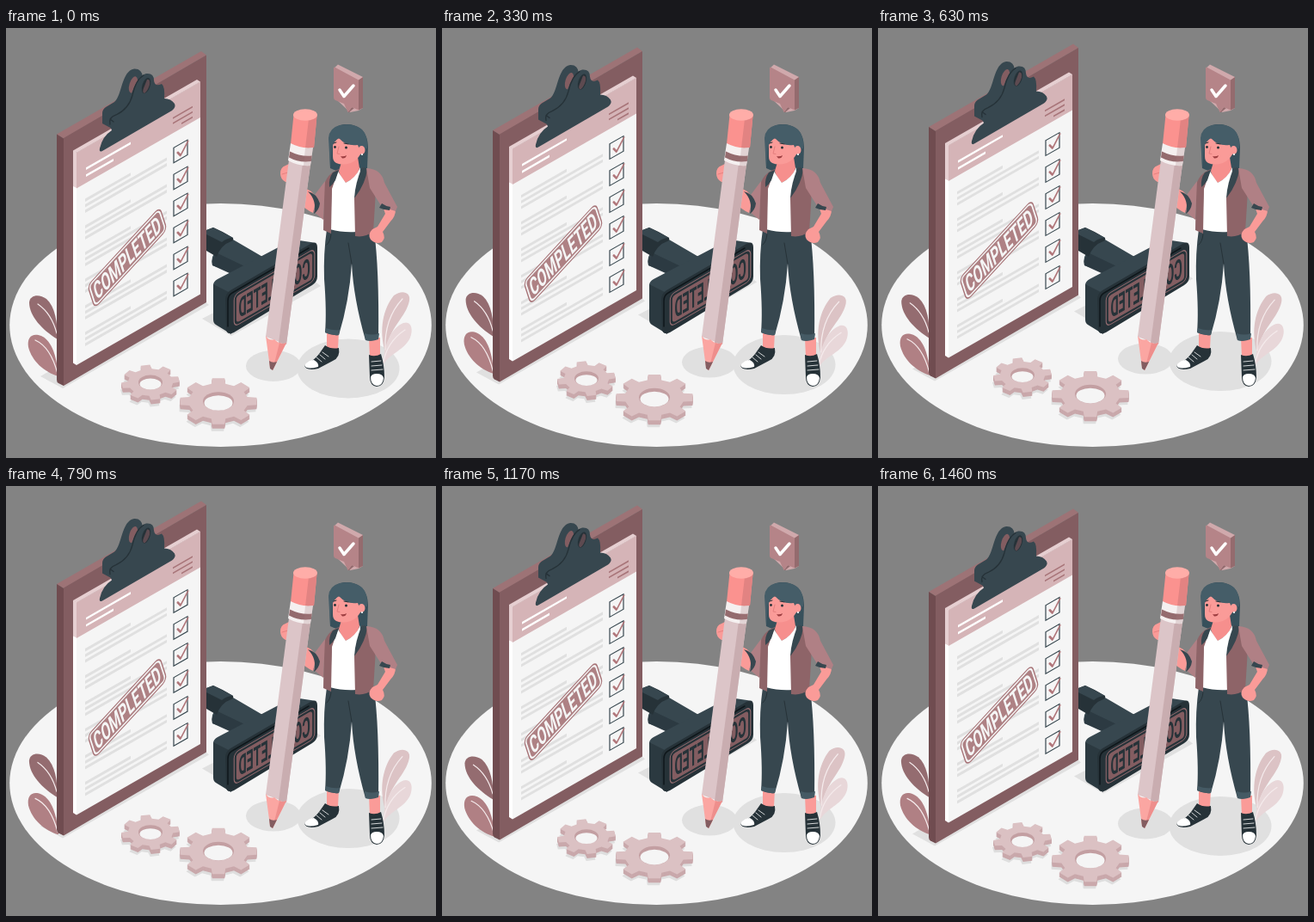
Recreate the animation shown at these times as an HTML page. Size 500x500 px, loop 1500 ms.

```html
<!DOCTYPE html>
<html lang="en">
<head>
<meta charset="utf-8">
<title>Completed checklist</title>
<style>
html, body { margin: 0; width: 100%; height: 100%; overflow: hidden; background: #838383; }
svg { display: block; width: 100vw; height: 100vh; }
.mark { font: bold 24px Roboto, "Liberation Sans", sans-serif; text-anchor: middle; }
.line { fill: none; stroke-linecap: round; stroke-linejoin: round; }
</style>
</head>
<body>
<svg viewBox="0 0 500 500" xmlns="http://www.w3.org/2000/svg">
  <ellipse cx="249.5" cy="345.5" rx="245.3" ry="141.5" fill="#f5f5f5"/>

  <g class="float" fill="#e0e0e0">
    <path d="M40 405L66 419L236 322L214 304Z"/>
    <path d="M228 338L262 358L366 300L340 280Z"/>
    <ellipse cx="311" cy="393" rx="32" ry="18"/>
    <ellipse cx="398" cy="396" rx="59.5" ry="34.5"/>
  </g>

  <g id="plants">
    <path d="M60 362C42 351 27 335 27 319C28 310 39 309 47 315C57 324 60 342 60 362Z" fill="#946c70"/>
    <path d="M61 405C44 400 30 387 26 371C24 359 31 354 41 358C54 364 59 383 61 405Z" fill="#b08084"/>
    <path d="M441 377C433 350 439 326 451 311C460 304 471 307 469 317C465 337 446 347 441 377Z" fill="#dcc3c5"/>
    <path d="M439 391C439 368 448 349 462 343C471 340 474 350 470 360C463 375 448 377 439 391Z" fill="#e8d7d9"/>
    <g class="line" stroke="#f5ebec" stroke-width="1.2">
      <path d="M37 321Q53 332 59 355M34 363Q52 371 60 402M461 315C448 329 440 349 441 374M464 351C450 360 441 374 439 389"/>
    </g>
  </g>

  <g id="stamp">
    <path d="M264 246L300 267L286 292L240 276Q237 266 247 255Q255 246 264 246Z" fill="#37474f"/>
    <path d="M240 276Q238 268 246 262L290 283L284 296Z" fill="#2c3a42"/>
    <path d="M233 235L241 232Q249 235 264 244Q265 247 262 248Q250 252 245 266L233 259Z" fill="#263238"/>
    <path d="M233 235L241 232L264 244Q257 244 251 249L233 240Z" fill="#37474f"/>
    <path d="M241 299Q241 295 246 292L332 247Q337 245 341 247L361 250L258 314Z" fill="#37474f"/>
    <path d="M241 298L261 308L262 356L244 345Q241 343 241 339Z" fill="#2b3940"/>
    <path d="M255 316Q255 309 261 305L354 251Q362 247 362 255V289Q362 295 356 299L265 354Q256 358 256 349Z" fill="#263238"/>
    <path d="M258 347V317Q258 311 263 308L352 256" class="line" stroke="#0f171b" stroke-width="1.5"/>
    <g transform="matrix(-.866 .5 0 1 312 302)">
      <rect x="-54" y="-18.5" width="108" height="37" rx="6" fill="none" stroke="#946c70" stroke-width="1.2"/>
      <rect x="-51" y="-15.5" width="102" height="31" rx="4" fill="#835d61"/>
      <text class="mark" fill="#263238" transform="translate(0 11.5) scale(.69 1.34)">COMPLETED</text>
    </g>
  </g>

  <g class="float">
    <path d="M59 123.5L227 27L233 31.5L67 128.5Z" fill="#9d7376"/>
    <path d="M59 123.5L67 128.5V416L61 413Q59 412 59 409Z" fill="#704c50"/>
    <path d="M67 128L233 31.5V319L67 416Z" fill="#835d61"/>
    <path d="M78 142.5L222 60L226 62.5L82 145Z" fill="#e6cfd1"/>
    <path d="M78 142.5L82 145V392L78 389.5Z" fill="#fff"/>
    <path d="M78 142.5L82 145V186L78 184Z" fill="#e6cfd1"/>
    <g id="paper" transform="matrix(1 -.573 0 1 82 145)">
      <path d="M0 0H144V247H0Z" fill="#f5f5f5"/>
      <path d="M0 0H144V41.5H0Z" fill="#d5b4b7"/>
      <path d="M11 25H63M11 33H43" stroke="#fff" stroke-width="2.7"/>
      <path d="M112 24H135M112 30H135M122 36H135" stroke="#a87579" stroke-width="1.8"/>
    </g>
    <g transform="matrix(.79 -.86 .28 .86 141 267)">
      <rect x="-53" y="-15" width="106" height="30" rx="6" fill="#f5f5f5" stroke="#a87579" stroke-width="1.4"/>
      <rect x="-50.5" y="-12.5" width="101" height="25" rx="4" fill="#ae8184"/>
      <text class="mark" fill="#f5f5f5" transform="translate(0 10.2) scale(.69 1.2)">COMPLETED</text>
    </g>
    <path d="M112 99Q112 95 116 92L126 86C135 79 134 50 149 47.5Q158 47 159 57L180 84L125 118L112 111Z" fill="#37474f"/>
    <ellipse cx="148" cy="66" rx="4.5" ry="10" transform="rotate(17 148 66)" fill="#835d61"/>
    <path d="M121 114C117 104 128 103 136 95C146 86 148 57 163 53Q172 52 172 61Q173 69 181 65Q185 68 184 82Q192 82 196 88Q198 92 193 96L112 143Q108 145 109 140Q112 126 123 119Z" fill="#37474f"/>
    <ellipse cx="163" cy="67" rx="4.5" ry="9.5" transform="rotate(18 163 67)" fill="#263238"/>
    <path d="M164 60Q168 59 167 66Q165 73 161 76Q158 75 160 70Z" fill="#5d4a50"/>
    <path d="M121 112Q119 104 128 101Q143 94 147 78Q151 60 160 55M121 106L125 109" class="line" stroke="#263238" stroke-width="1.3"/>
  </g>

  <g class="float" id="gears"></g>

  <g id="bubble">
    <path d="M381 47L386 42.5L415 57V93L410 96L400 98L381 80Z" fill="#d0a9ac"/>
    <path d="M410 60.5L415 57V93L410 95.5Z" fill="#946b6e"/>
    <path d="M402 92L405 93L399 98L397.5 98Z" fill="#946b6e"/>
    <path d="M381 47Q381 45 383 46L410 60.5V95.5L402 92L397.5 98L393 88L383 84Q381 83 381 81Z" fill="#b58488"/>
    <path d="M388 72L393 79.5L404 67" class="line" stroke="#fff" stroke-width="3.5"/>
  </g>

  <g id="woman">
    <path d="M373 353H387L386 373Q378 376 373 371ZM422 360H435V383H423Z" fill="#fa9b98"/>
    <path d="M371 369Q378 374 387 372Q389 383 380 387L363 396Q348 399 347 392Q357 388 364 379Z" fill="#263238"/>
    <path d="M347 392Q352 386 358 386Q364 389 363 394Q349 398 347 392Z" fill="#fff"/>
    <path d="M422 380Q429 383 436 379Q440 392 440 406Q439 417 431 417Q423 416 423 406Z" fill="#263238"/>
    <path d="M424 406Q425 402 431 402Q438 402 439 407Q438 416 431 416Q424 415 424 406Z" fill="#fff"/>
    <path d="M365 380L371 385M368 377L375 382M361 383L367 388M425 388L436 387M425 393L437 392M425 398L438 397" class="line" stroke="#fff" stroke-width=".8"/>
    <path d="M373 234L428 236Q434 280 433 361Q426 365 418 363Q404 314 402 274Q399 318 387 357Q379 358 371 354Q373 330 370 292Q369 262 373 234Z" fill="#37474f"/>
    <path d="M372 349Q380 352 388 351L387 357Q379 358 371 354ZM417 355Q426 358 434 355L433 362Q426 365 418 363Z" fill="#455a64"/>
    <path d="M402 274L398 250M378 240Q377 249 373 252" class="line" stroke="#263238" stroke-width="1"/>

    <path d="M376 132C375 118 386 111 398 112C412 113 421 122 421 139L420 163L412 166L397 166Q386 168 377 163Z" fill="#37505b"/>
    <path d="M391 153L409 150L411 163Q410 172 395 180Q388 172 387 166Z" fill="#f68f8d"/>
    <path d="M386 167L395 180Q407 174 412 162L411 180L407 237Q391 238 377 234L379 183Z" fill="#fff"/>
    <path d="M387 164Q372 170 370 184L369 235L378 239L379 187Z" fill="#8e6468"/>
    <path d="M387 165L380 168Q375 175 376 185Q380 182 383 177Z" fill="#37474f"/>
    <path d="M414 162L424 166Q431 179 429 206L427 237Q417 244 406 242L405 198Z" fill="#8e6468"/>
    <path d="M414 162L420 163Q419 180 405 198Q406 180 414 162Z" fill="#37474f"/>
    <path d="M438 207L453 211Q453 219 447 225L438 237Q442 244 437 249Q430 252 424 246Q420 240 426 234L432 231L441 216Z" fill="#fa9b98"/>
    <path d="M419 163Q437 164 440 180L455 208L453 213L437 208L423 186Z" fill="#b08085"/>
    <path d="M437 204Q441 207 447 208L446 212Q440 212 434 209Z" fill="#37474f"/>
    <path d="M345 186Q355 187 361 198L357 215Q348 211 341 203Z" fill="#fa9b98"/>
    <path d="M371 178L369 223L357 213Q364 205 359 194Z" fill="#b08085"/>
    <path d="M351 190Q361 192 365 204Q364 212 358 216Q362 201 351 190Z" fill="#37474f"/>
    <path d="M329 158L325 160Q319 162 319 169Q319 176 325 179L334 180V160Z" fill="#fa9b98"/>
    <path d="M321 170L328 168" class="line" stroke="#e47f7e" stroke-width=".9"/>

    <path d="M380 128L411 130L412 147Q408 154 401 157Q391 160 384 157Q380 155 380 149Z" fill="#fa9b98"/>
    <path d="M375 128Q376 116 388 113Q404 110 414 118Q421 125 420 140L411 141L409 136Q396 138 387 128Q381 132 379 139L377 163Z" fill="#455d68"/>
    <ellipse cx="413.5" cy="142" rx="4" ry="5" fill="#fa9b98"/>
    <circle cx="414" cy="147" r="1.1" fill="#fff"/>
    <circle cx="382.5" cy="138.5" r="1.4" fill="#263238"/>
    <circle cx="395.5" cy="139" r="1.5" fill="#263238"/>
    <path d="M393 134L398 135M381 134L384 133" class="line" stroke="#263238" stroke-width="1"/>
    <path d="M387 138L385 146L388 146.5" class="line" stroke="#e47f7e" stroke-width="1"/>
    <path d="M389 149Q393 150 396 148Q395 152 391 151.5Z" fill="#9c3d40"/>
  </g>

  <g id="pencil">
    <path d="M330 146L355 151L326 368L302 359Z" fill="#dcc5c8"/>
    <path d="M346 150L355 151L326 368L317 366Z" fill="#c9adb0"/>
    <path d="M302 358Q306 364 312 362Q319 369 326 366L310 398L307 395Z" fill="#fba6a2"/>
    <path d="M318 366Q322 368 326 366L310 398Z" fill="#ee8e8c"/>
    <path d="M306 387Q310 390 315 388L310 398L307 396Z" fill="#835d61"/>
    <path d="M334.5 101L361.5 102L358 139Q344 142 331 135Z" fill="#fb928f"/>
    <path d="M352 106L361.5 102L358 139Q353 140 348 139.5Z" fill="#e28382"/>
    <ellipse cx="348" cy="101" rx="14" ry="6.8" fill="#ffada8"/>
    <path d="M331 134Q344 141 357 139L354 160Q340 161 328 154Z" fill="#f5f0f0"/>
    <path d="M330 143.5Q343 150 355.7 148.5L354.8 155Q341 157 329 150.5Z" fill="#946b6e"/>
    <path d="M348 139.5L357 139L354 160L346 160Z" fill="#a87c80" opacity=".25"/>
  </g>
</svg>
<script>
const NS = "http://www.w3.org/2000/svg";
const LOOP = 1500;
const $ = id => document.getElementById(id);

function add(parent, tag, attrs) {
  const el = document.createElementNS(NS, tag);
  for (const key in attrs) el.setAttribute(key, attrs[key]);
  parent.appendChild(el);
  return el;
}

// Rows on the paper: three text lines, a box and a tick
for (let row = 0; row < 6; row++) {
  const y = 61 + row * 31;
  add($("paper"), "path", {
    d: `M10 ${y}H63M10 ${y + 6.5}H105M10 ${y + 13}H105`,
    stroke: "#e0e0e0", "stroke-width": 3.4
  });
  add($("paper"), "rect", {
    x: 113, y: y - 2, width: 16, height: 17.5,
    fill: "none", stroke: "#37474f", "stroke-width": 1.2
  });
  add($("paper"), "path", {
    d: `M117.5 ${y + 6}L121 ${y + 11.5}L129.5 ${y}`,
    class: "line", stroke: "#b0767a", "stroke-width": 2.1
  });
}

// Flat cog outline with eight teeth
function cog(r, turn) {
  const pts = [];
  for (let i = 0; i < 8; i++) {
    const mid = turn + i * Math.PI / 4;
    for (const [da, k] of [[-.24, .77], [-.16, 1], [.16, 1], [.24, .77]]) {
      const a = mid + da;
      pts.push((r * k * Math.cos(a)).toFixed(1) + " " + (r * k * .6 * Math.sin(a)).toFixed(1));
    }
  }
  return "M" + pts.join("L") + "Z";
}

function gear(x, y, r, hole, turn) {
  const g = add($("gears"), "g", { transform: `translate(${x} ${y})` });
  const d = cog(r, turn);
  const layer = (dx, dy, fill) => add(g, "path", { d, fill, transform: `translate(${dx} ${dy})` });
  layer(-1, 8, "#dedede");
  for (let dy = 5; dy > 0; dy--) layer(0, dy, "#c9a8ab");
  layer(0, 0, "#dbc1c3");
  add(g, "ellipse", { rx: hole, ry: hole * .6, fill: "#c39fa2" });
  add(g, "ellipse", { cy: 2, rx: hole - 1.5, ry: hole * .6 - 2, fill: "#f5f5f5" });
}
gear(168, 412, 34, 14, -.18);
gear(247, 434, 45, 18, 0);

const floating = document.querySelectorAll(".float");

function draw(t) {
  const p = t % LOOP / LOOP;
  const lift = -10 * (1 - Math.abs(2 * p - 1));
  // Sway: 0 to 1 to -1 to 0 degrees, linear
  const sway = p < .25 ? 4 * p : p < .75 ? 2 - 4 * p : 4 * p - 4;
  floating.forEach(el => el.setAttribute("transform", `translate(0 ${lift})`));
  $("plants").setAttribute("transform", `rotate(${sway} 249 357)`);
}

const start = performance.now();
function tick() {
  draw(performance.now() - start);
  requestAnimationFrame(tick);
}
tick();
</script>
</body>
</html>
```
